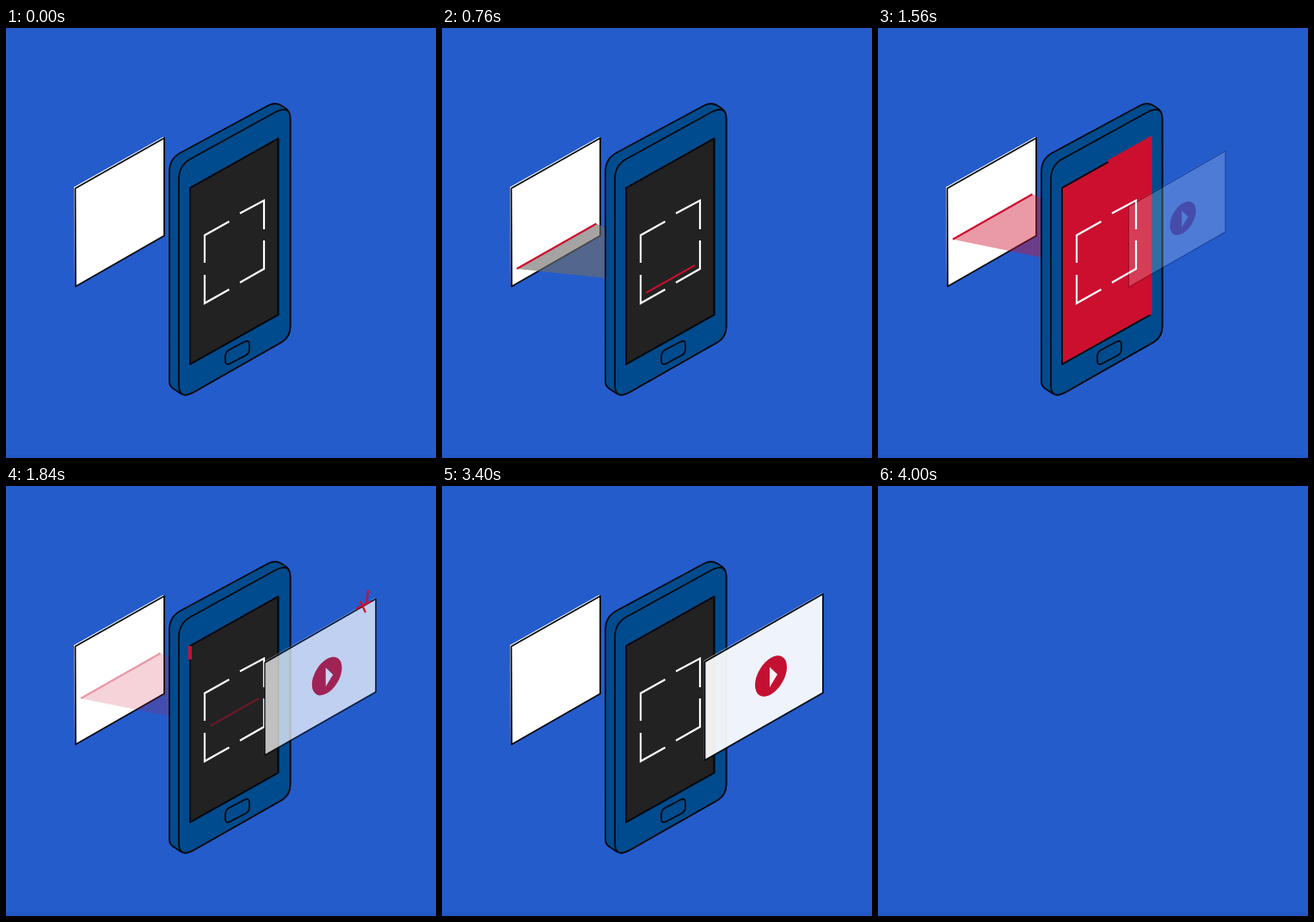
Write an HTML page that moves like this. It is 500 px wide and 500 px high and loops after 4.04 s.

```html
<!DOCTYPE html>
<html lang="en">
<head>
<meta charset="utf-8">
<title>Phone scan</title>
<style>
  html, body { margin: 0; width: 100%; height: 100%; overflow: hidden; background: #245ccc; }
  svg { display: block; width: 100%; height: 100%; }
  .ink { stroke: #05080e; stroke-width: 1.8; stroke-linejoin: round; }
  .red { stroke: #cc0f2e; stroke-width: 2.2; }
</style>
</head>
<body>
<svg viewBox="0 0 500 500" fill="none">
  <path d="M0 496H500V500H0Z" fill="#2258c6"/>
  <g id="scene">
    <!-- card -->
    <path d="M79 185L183 126.500V240L80 299Z" fill="#fff"/>
    <path class="ink" d="M80.500 186.500L184 128V241.500L81 300.500Z" fill="#fff"/>

    <g id="scan">
      <path id="beam"/>
      <path class="red" id="cardLine" d="M87 0L179.500 -52.500"/>
    </g>

    <!-- phone -->
    <g class="ink" fill="#004b8d">
      <path d="M190 411V167Q190 152 203 145L305 90Q313 86 320 90L326 94Q330.500 98 330.500 105V347Q330.500 359 321 365L219 423Q209 429 203 425L194 419Q190 416 190 411Z"/>
      <path d="M201 415V176Q201 160 214 152.500L313 98Q330.500 89 330.500 106V347Q330.500 359 321 365L219 423Q201 433 201 415Z"/>
      <path d="M255 382Q255 377 259 374.500L277 365Q283 362 283 368V373Q283 378 279 380.500L261 390Q255 393 255 387Z"/>
    </g>
    <path class="ink" d="M214 186L316.500 128.500V333.500L214 391Z" fill="#222"/>
    <path class="red" id="screenLine" d="M237.500 0L294 -32"/>
    <path id="flash" d="M214 186L316.500 128.500V333.500L214 391Z" fill="#cc0f2e"/>
    <path class="ink" d="M214 186L316.500 128.500V333.500L214 391Z"/>
    <path id="trace" d="M214 186L316.500 128.500V333.500L214 391Z" pathLength="100" stroke="#cc0f2e" stroke-width="4"/>
    <path d="M231 273V241L259.500 225M272 215.500L300 200.500V234M300 247V280L272 296M259.500 304L231 320V287" stroke="#fff" stroke-width="2.200"/>

    <!-- video panel -->
    <g id="panel">
      <path d="M304.500 203L442.500 124V239L304.500 318Z" fill="#fff" fill-opacity=".5"/>
      <path class="ink" d="M305.500 204.500L443 125.500V240.500L305.500 319Z" fill="#fff" fill-opacity=".9"/>
      <circle r="18.500" transform="matrix(1 -.57 0 1.150 382.500 221)" fill="#c8102e"/>
      <path d="M381 210.500V234L390 219Z" fill="#fff"/>
    </g>
    <path class="red" id="spark" d="M1 -14L-1 3M-13 8L4 -1M-8 -1L-2 12"/>
  </g>
</svg>
<script>
const LOOP = 4040, STEP = 40;
const el = {};
document.querySelectorAll('[id]').forEach(e => el[e.id] = e);

const ramp = (t, a, b) => Math.min(1, Math.max(0, (t - a) / (b - a)));
const ease = (t, a, b) => (1 - Math.cos(Math.PI * ramp(t, a, b))) / 2;
const mix = (a, b, k) => a + (b - a) * k;
const set = (e, attrs) => { for (const k in attrs) e.setAttribute(k, attrs[k]); };

function drawScan(t) {
  // middle, bottom, top, back to middle
  const y = 247 + 36 * ease(t, 120, 680) - 70 * ease(t, 680, 1280) + 34 * ease(t, 1280, 1600);
  const shown = ramp(t, 0, 320) * (1 - ramp(t, 1680, 1960));
  const tint = ramp(t, 1000, 1200);
  const rgb = [[110, 204], [108, 15], [106, 46]].map(([a, b]) => Math.round(mix(a, b, tint)));
  const low = mix(y, 315, 105 / 337);
  set(el.scan, { opacity: shown });
  set(el.cardLine, { transform: `translate(0 ${y})` });
  set(el.screenLine, { transform: `translate(0 ${279 + (y - 247) * 0.875})`, opacity: shown });
  set(el.beam, {
    d: `M87 ${y}L179.500 ${y - 52.5}L192 ${y - 47}V${low}Z`,
    fill: `rgb(${rgb})`,
    'fill-opacity': mix(0.62, 0.42, tint)
  });
}

function drawScreen(t) {
  const tail = 100 * ease(t, 1480, 1880), head = 100 * ease(t, 1360, 1760);
  set(el.flash, { opacity: ease(t, 1400, 1540) * (1 - ease(t, 1600, 1760)) });
  set(el.trace, { 'stroke-dasharray': `${head - tail} 200`, 'stroke-dashoffset': -tail });
}

function drawPanel(t) {
  const k = (Math.max(0, 2222 - t) / 662) ** 2;
  const s = 1 - 0.18 * k;
  set(el.panel, {
    transform: `translate(${374 - 26.5 * k} 222) scale(${s}) translate(-374 -222)`,
    opacity: ramp(t, 1458, 1967) * (1 - ease(t, 3360, 3760))
  });
  const go = (t - 1840) / 480;
  set(el.spark, {
    transform: `translate(${420 + 34 * go} ${135 - 11 * go})`,
    opacity: t < 1760 ? 0 : 1 - ramp(t, 2080, 2320)
  });
}

function frame(now) {
  const t = Math.floor(now % LOOP / STEP) * STEP;
  el.scene.style.display = t < 4000 ? '' : 'none';
  drawScan(t);
  drawScreen(t);
  drawPanel(t);
  requestAnimationFrame(frame);
}
frame(0);
</script>
</body>
</html>
```
